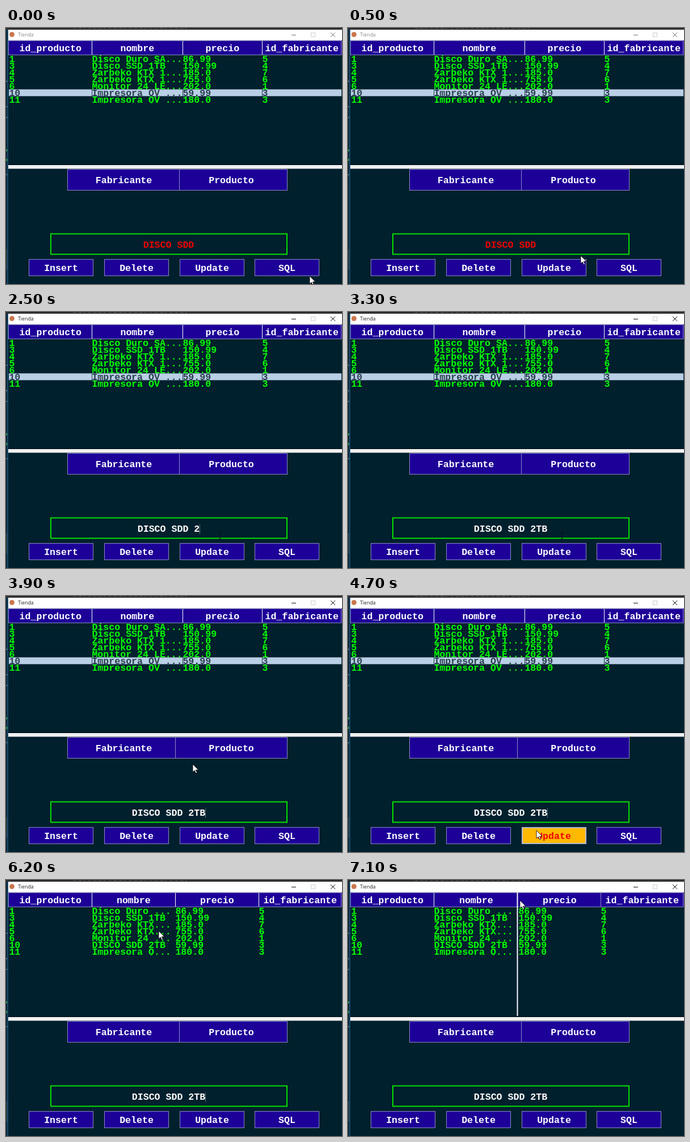
An HTML page with a canvas for the animation above (7200 ms loop, 592 by 452 pixels).

```html
<!DOCTYPE html>
<html lang="es">
<head>
<meta charset="utf-8">
<title>Tienda</title>
<style>
html, body { margin: 0; width: 592px; height: 452px; overflow: hidden; background: #00202d; }
canvas { display: block; }
</style>
</head>
<body>
<canvas id="stage" width="592" height="452"></canvas>
<script>
const ctx = document.getElementById('stage').getContext('2d');
const LOOP = 7200, STEP = 100;
const MONO = 'bold 16.6px "Liberation Mono", "Courier New", monospace';
const C = {
  bg: '#00202d', blue: '#1d0098', edge: '#8d88c4', green: '#00ff00',
  amber: '#ffb900', red: '#f00000', pick: '#b8cfe5', pale: '#f0f0f0'
};

const rows = [
  ['1', 'Disco Duro SATA3 1TB', '86.99', '5'],
  ['3', 'Disco SSD 1TB', '150.99', '4'],
  ['4', 'Zarbeko KTX 1050Ti', '185.0', '7'],
  ['5', 'Zarbeko KTX 1080 Xtreme', '755.0', '6'],
  ['6', 'Monitor 24 LED Full HD', '202.0', '1'],
  ['10', 'Impresora QV Deskline 3720', '59.99', '3'],
  ['11', 'Impresora QV Laser Pro', '180.0', '3']
];
const heads = ['id_producto', 'nombre', 'precio', 'id_fabricante'];

// pointer path: time, x, y
const path = [
  [0, 535, 438], [200, 505, 428], [500, 410, 402], [700, 377, 395],
  [3600, 377, 395], [3700, 362, 335], [3800, 342, 275], [3900, 329, 297],
  [4100, 330, 350], [4400, 331, 402], [4600, 332, 414], [5500, 332, 414],
  [5700, 312, 350], [5900, 290, 210], [6200, 269, 90], [6500, 272, 84],
  [6800, 299, 36], [6900, 300, 36], [7100, 303, 36], [7200, 303, 36]
];
const typed = [[0, 'DISCO SDD'], [1800, 'DISCO SDD '], [2200, 'DISCO SDD 2'],
  [2700, 'DISCO SDD 2T'], [3000, 'DISCO SDD 2TB']];

function pointer(t) {
  const i = path.findIndex(p => p[0] > t);
  const a = path[i - 1], b = path[i];
  const k = (t - a[0]) / (b[0] - a[0]);
  return { x: a[1] + (b[1] - a[1]) * k, y: a[2] + (b[2] - a[2]) * k };
}

function rect(x, y, w, h, color) {
  ctx.fillStyle = color;
  ctx.fillRect(x, y, w, h);
}

function frame(x, y, w, h, color, line = 1) {
  ctx.strokeStyle = color;
  ctx.lineWidth = line;
  ctx.strokeRect(x + line / 2, y + line / 2, w - line, h - line);
}

function text(s, x, y, color, align = 'left', font = MONO) {
  ctx.font = font;
  ctx.textAlign = align;
  ctx.fillStyle = color;
  ctx.fillText(s, x, y);
}

function strokes(color, width, ...lines) {
  ctx.strokeStyle = color;
  ctx.lineWidth = width;
  ctx.beginPath();
  for (const [x1, y1, x2, y2] of lines) {
    ctx.moveTo(x1, y1);
    ctx.lineTo(x2, y2);
  }
  ctx.stroke();
}

const inside = (p, x, y, w, h) => p.x >= x && p.x < x + w && p.y >= y && p.y < y + h;
const clipText = (s, max) => s.length > max ? s.slice(0, max - 3) + '...' : s;

function drawWindow(active) {
  rect(0, 0, 592, 452, C.bg);
  rect(0, 0, 592, 3, '#2c2e30');
  for (let x = 118; x < 325; x += 9) rect(x, 0, 3 + x % 4, 1, '#55585a');
  rect(0, 3, 3, 449, '#10232d');
  for (const y of [214, 231]) rect(0, y, 2, 4, '#2a8b3a');
  for (const y of [93, 138, 157, 258, 425]) rect(0, y, 2, 2, '#557480');
  rect(0, 390, 2, 37, '#2c3940');
  rect(2, 3, 2, 449, '#174d72');
  rect(4, 3, 588, 18, '#ffffff');
  rect(4, 21, 588, 1, '#b9c3ca');
  ctx.fillStyle = '#c9784e';
  ctx.beginPath();
  ctx.arc(10.5, 11.5, 4.5, 0, 7);
  ctx.fill();
  text('Tienda', 21, 15, active ? '#222' : '#888', 'left', '8.8px "Open Sans", "Noto Sans", sans-serif');
  const ink = active ? '#111' : '#777';
  strokes(ink, 1, [503, 12.5, 511, 12.5]);
  frame(537, 8, 8, 8, '#d0d0d0');
  strokes(ink, 1, [572, 8, 580, 16], [580, 8, 572, 16]);
}

function drawTable(t) {
  const done = t >= 5000;
  const drag = t >= 6900 ? 2 : 0;
  const cols = done ? [5, 151, 298 + drag, 445, 591] : [5, 151, 311, 451, 591];
  rect(4, 22, 588, 26, C.blue);
  frame(4, 22, 587, 26, C.edge);
  heads.forEach((h, i) => {
    text(h, (cols[i] + cols[i + 1]) / 2 + 0.3, 41, '#fff', 'center');
    if (i) rect(cols[i] - (drag && i === 2 ? 2 : 0), 23, 1, 24, drag && i === 3 ? C.edge : '#fff');
  });
  rows.forEach((row, r) => {
    const y = 48 + r * 12.07;
    const picked = r === 5 && !done;
    if (picked) rect(5, y, 586, 12, C.pick);
    row.forEach((cell, i) => {
      const value = r === 5 && i === 1 && done ? 'DISCO SDD 2TB' : cell;
      ctx.save();
      ctx.beginPath();
      ctx.rect(cols[i], y, cols[i + 1] - cols[i], 12.3);
      ctx.clip();
      text(clipText(value, done ? 14 : 16), cols[i] + 0.4, y + 12, picked ? '#29404e' : C.green);
      ctx.restore();
      if (picked && i) rect(cols[i], y, 1, 12, '#24404f');
    });
  });
  if (drag) rect(297.5, 22, 2, 220, '#f4f4ff');
  rect(4, 240, 588, 2, '#00131c');
  rect(4, 242, 588, 6, C.pale);
  rect(4, 248, 588, 1, '#77838a');
}

function button(label, x, y, w, h, p, mid = x + w / 2) {
  const over = inside(p, x, y, w, h);
  rect(x, y, w, h, over ? C.amber : C.blue);
  frame(x, y, w, h, over ? '#b3b9d3' : C.edge, over ? 2 : 1);
  text(label, mid, y + h / 2 + 5.5, over ? C.red : '#fff', 'center');
}

function drawControls(t, p) {
  const split = t >= 3800 && t < 5800 ? 298 : 305;
  button('Fabricante', 108, 249, split - 107, 38, p, 207.5);
  button('Producto', split, 249, 496 - split, 38, p, 397);
  ['Insert', 'Delete', 'Update', 'SQL'].forEach((s, i) =>
    button(s, Math.round(40 + i * 132.8), 408, 114, 30, p));

  frame(78, 362.5, 418, 38, '#00e000', 2);
  const value = typed.filter(e => e[0] <= t).pop()[1];
  text(value, 286.5, 388, t < 900 ? C.red : '#fff', 'center');
  const caret = t >= 1700 && t < 6900 && !(t >= 3300 && t < 3700);
  if (caret) rect(Math.round(286.5 + value.length * 4.98), 375, 1, 17, '#5c7078');
}

function drawPointer(p) {
  const { x, y } = p;
  if (inside(p, 78, 363, 418, 37)) {
    strokes('#000c12', 1, [x, y - 5, x, y + 5], [x - 2, y - 5.5, x + 2, y - 5.5], [x - 2, y + 5.5, x + 2, y + 5.5]);
    return;
  }
  const shape = [[0, 0], [0, 14], [3.2, 11], [5.5, 16], [7.6, 15], [5.4, 10.2], [10, 10]];
  ctx.beginPath();
  shape.forEach(([dx, dy]) => ctx.lineTo(x + dx, y + dy));
  ctx.closePath();
  ctx.fillStyle = '#fff';
  ctx.fill();
  ctx.strokeStyle = '#000';
  ctx.lineWidth = 0.8;
  ctx.stroke();
}

function draw(now) {
  const t = Math.floor(now % LOOP / STEP) * STEP;
  const p = pointer(t);
  drawWindow(t >= 900);
  drawTable(t);
  drawControls(t, p);
  drawPointer(p);
  requestAnimationFrame(draw);
}

const start = performance.now();
draw(0);
function tick() {
  return performance.now() - start;
}
</script>
</body>
</html>
```
